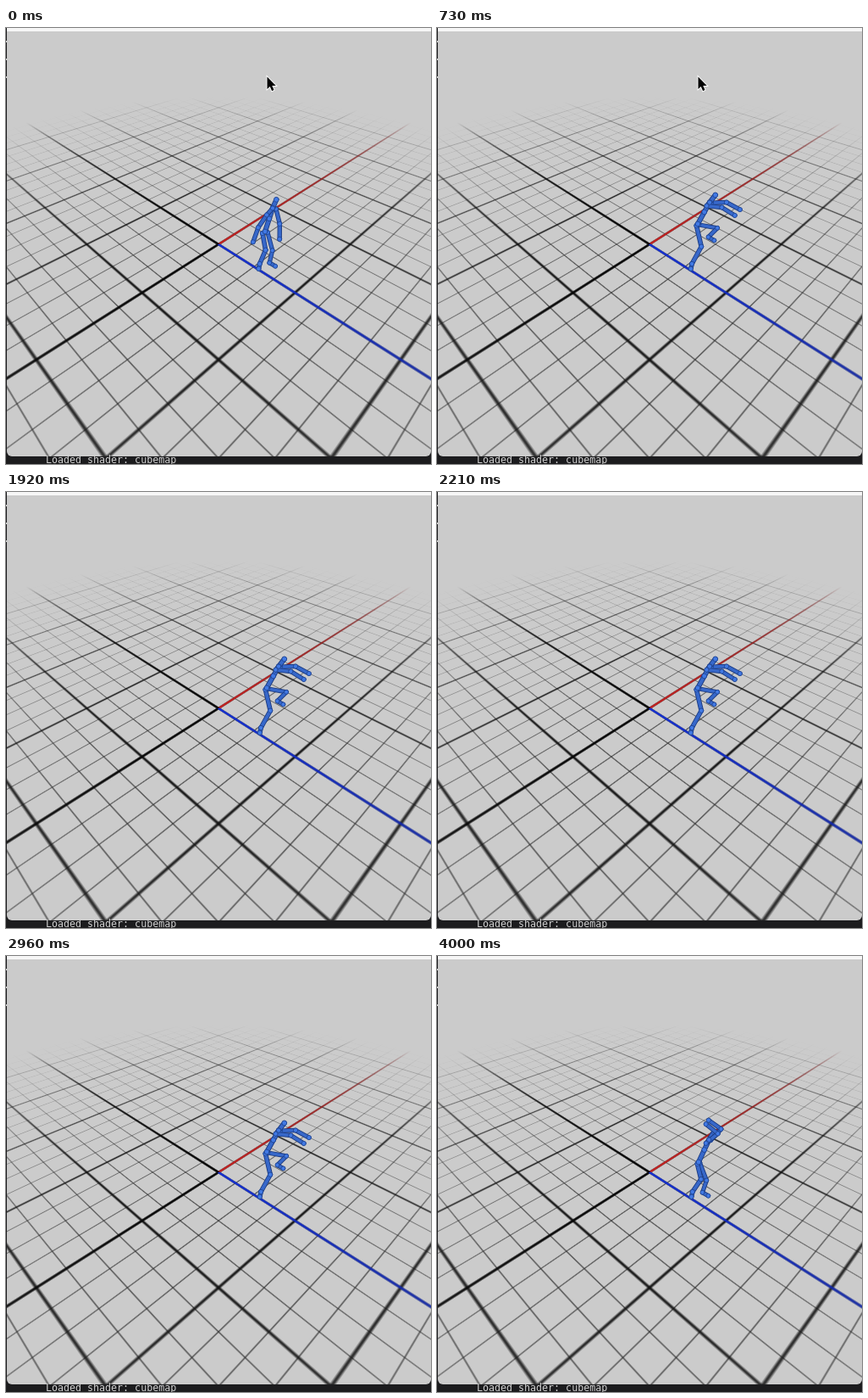
Animation, 502 px wide and 514 px high, one loop 4100 ms. Source, as an HTML page with a canvas:

```html
<!DOCTYPE html>
<html lang="en">
<head>
<meta charset="utf-8">
<title>Motion viewer</title>
<style>
  html, body { margin: 0; width: 100%; height: 100%; overflow: hidden; background: #1c1c1e; }
  canvas { position: absolute; left: 0; top: 0; }
  p {
    position: absolute; left: 47px; top: 502px; margin: 0; white-space: pre; color: #d2d2d2;
    font: 11.65px/14px "DejaVu Sans Mono", monospace;
  }
</style>
</head>
<body>
<canvas id="view" width="502" height="514"></canvas>
<p>Loaded shader: cubemap</p>
<script>
const W = 502, H = 514, LOOP = 4100, STEP = 148;
const ctx = document.getElementById('view').getContext('2d');
const clamp = (v, a = 0, b = 1) => Math.min(b, Math.max(a, v));
const mix = (a, b, t) => a + (b - a) * t;

// ---- Ground: perspective grid, one unit per heavy line ----
const CX = 251, CY = 255, SCALE = 77.8, TILT = 13.85, PERSP = 0.1385, CELLS = 4;

function line(coord, grad, width) {
  const d = Math.abs(coord) / grad, half = width / grad / 2, soft = 0.5 + half * 0.3;
  return clamp((half + soft - d) / (2 * soft)) * Math.min(1, half / soft + 0.28);
}

function shade(px, py) {
  const x = px - CX, den = TILT + PERSP * py;
  const v = (py - CY) / den, w = 1 - PERSP * v, u = x * w / SCALE;
  const vy = (TILT + CY * PERSP) / (den * den);
  const ux = w / SCALE, uy = -PERSP * vy * x / SCALE;
  const i = (u + v) / 2, j = (v - u) / 2;
  const gi = Math.hypot(ux, uy + vy) / 2, gj = Math.hypot(ux, vy - uy) / 2;
  const fade = 1 - clamp(Math.hypot(i, j) / 4.9) ** 1.25;
  let rgb = [203, 203, 203];
  const paint = (color, a) => { rgb = rgb.map((c, n) => mix(c, color[n], a * fade)); };
  const grid = (cells, width, color) => {
    const near = c => c - Math.round(c * cells) / cells;
    paint(color, line(near(i), gi, width));
    paint(color, line(near(j), gj, width));
  };

  grid(CELLS, 0.0095, [45, 45, 45]);
  grid(1, 0.025, [16, 16, 16]);
  paint(j < 0 ? [212, 30, 30] : [6, 6, 6], line(i, gi, 0.025));
  paint(i > 0 ? [16, 46, 226] : [6, 6, 6], line(j, gj, 0.026));
  return rgb;
}

function layer() {
  const c = document.createElement('canvas');
  c.width = W; c.height = H;
  return [c, c.getContext('2d')];
}

function makeGround() {
  const [c, g] = layer(), img = g.createImageData(W, H);
  for (let y = 0, k = 0; y < H; y++)
    for (let x = 0; x < W; x++, k += 4) img.data.set([...shade(x + 0.5, y + 0.5), 255], k);
  g.putImageData(img, 0, 0);
  return c;
}

function makeScene() {
  const [c, g] = layer();
  g.fillStyle = '#1c1c1e';
  g.fillRect(0, 0, W, H);
  g.save();
  g.beginPath();
  g.roundRect(1, -10, 501, 515, 6);
  g.clip();
  g.drawImage(makeGround(), 0, 0);
  g.fillStyle = '#f6f6f6';
  g.fillRect(0, 0, W, 4);
  g.restore();
  g.fillStyle = '#ccc';
  for (let y = 15; y < 60; y += 21) g.fillRect(0, y, 1, 2);
  return c;
}

// ---- Figure ----
// Angles in degrees: 0 hangs down, 90 points right.
// step, hip x, hip y, lean, arm swing, arm spread, elbow, knee lift
const poses = [
  [0, 306, 240, 18, -10, 24, 0, 15],
  [5, 308, 231, 29, 88, 4, -28, 80],
  [9, 305, 247, 25, -4, 3, 3, 46],
  [13, 305, 243, 9, -3, 5, 0, 16],
  [15, 287, 226, 3, -10, 75, 0, 20],
  [17, 293, 233, 7, -6, 28, 0, 7],
  [23, 304, 247, 20, 48, 31, -10, 54],
  [27, 309, 243, 25, 133, 4, 100, 21]
];

function poseAt(step) {
  const n = clamp(poses.findIndex(p => p[0] > step), 0) || poses.length - 1;
  const a = poses[n - 1], b = poses[n], f = clamp((step - a[0]) / (b[0] - a[0]));
  return a.map((v, k) => mix(v, b[k], f));
}

function from([x, y], deg, len) {
  const r = deg * Math.PI / 180;
  return [x + Math.sin(r) * len, y + Math.cos(r) * len];
}

function drawChain(points, width) {
  ctx.lineCap = 'round';
  for (let n = 1; n < points.length; n++) {
    ctx.beginPath();
    ctx.moveTo(...points[n - 1]);
    ctx.lineTo(...points[n]);
    for (const [color, w] of [['#1b3a80', width], ['#3768ca', width - 1.8]]) {
      ctx.strokeStyle = color;
      ctx.lineWidth = w;
      ctx.stroke();
    }
  }
  for (const p of points) {
    ctx.beginPath();
    ctx.arc(...p, width / 2 - 0.1, 0, 7);
    ctx.fillStyle = '#4179e4';
    ctx.fill();
    ctx.strokeStyle = '#20438f';
    ctx.lineWidth = 0.8;
    ctx.stroke();
  }
}

function drawFigure(at) {
  const [, x, y, lean, swing, spread, elbow, lift] = poseAt(at);
  const hip = [x, y], chest = from(hip, 180 - lean, 16), neck = from(hip, 180 - lean, 29);
  const head = from(neck, 180 - lean * 1.3, 11);
  const open = clamp(spread / 8);

  const arm = (side, dx, dy) => {
    const upper = swing + side * spread, lower = upper - side * spread * 0.6 + elbow;
    const shoulder = [neck[0] + dx * open, neck[1] + dy * open];
    const joint = from(shoulder, upper, 18);
    drawChain([neck, shoulder, joint, from(joint, lower, 18)], 5.4);
  };

  // Free leg folds back as the knee rises
  const hipR = [x + 3 * open, y + 1], kneeR = from(hipR, lift, 22);
  const ankleR = from(kneeR, -Math.min(45, lift * 0.9), 15);

  // Standing leg keeps its foot planted and bends with the lean
  const hipL = [x - 3 * open, y + 2], ankleL = [299 + (x - 305) * 0.7, 278];
  const kneeL = [mix(hipL[0], ankleL[0], 0.55) + lean * 0.3, mix(hipL[1], ankleL[1], 0.55)];

  arm(1, 4, 1);
  drawChain([hip, hipR, kneeR, ankleR, from(ankleR, 60, 8)], 5.2);
  drawChain([hip, hipL, kneeL, ankleL, from(ankleL, -12, 6)], 5.6);
  drawChain([hip, chest, neck, head], 6);
  arm(-1, -7, 8);
}

// ---- Pointer: rests, sweeps down, drifts out ----
const arrow = new Path2D('M0 0V14.5L3.3 11.5L5.6 16.7L8 15.6L5.8 10.5H10.3Z');

function drawPointer(step) {
  if (step > 10) return;
  const sweep = clamp((step - 6) / 2), drift = Math.max(0, step - 8);
  ctx.save();
  ctx.translate(308.5 + 113 * sweep + 9 * drift, 57.5 + 301 * sweep + 19 * drift);
  ctx.strokeStyle = '#fff';
  ctx.lineWidth = 1.8;
  ctx.stroke(arrow);
  ctx.fillStyle = '#000';
  ctx.fill(arrow);
  ctx.restore();
}

// ---- Playback in held steps ----
const scene = makeScene(), start = performance.now();

function frame() {
  const now = (performance.now() - start) % LOOP;
  const step = Math.min(27, Math.floor((now + 10) / STEP));
  ctx.drawImage(scene, 0, 0);
  drawFigure(step);
  drawPointer(step);
  requestAnimationFrame(frame);
}
frame();
</script>
</body>
</html>
```
